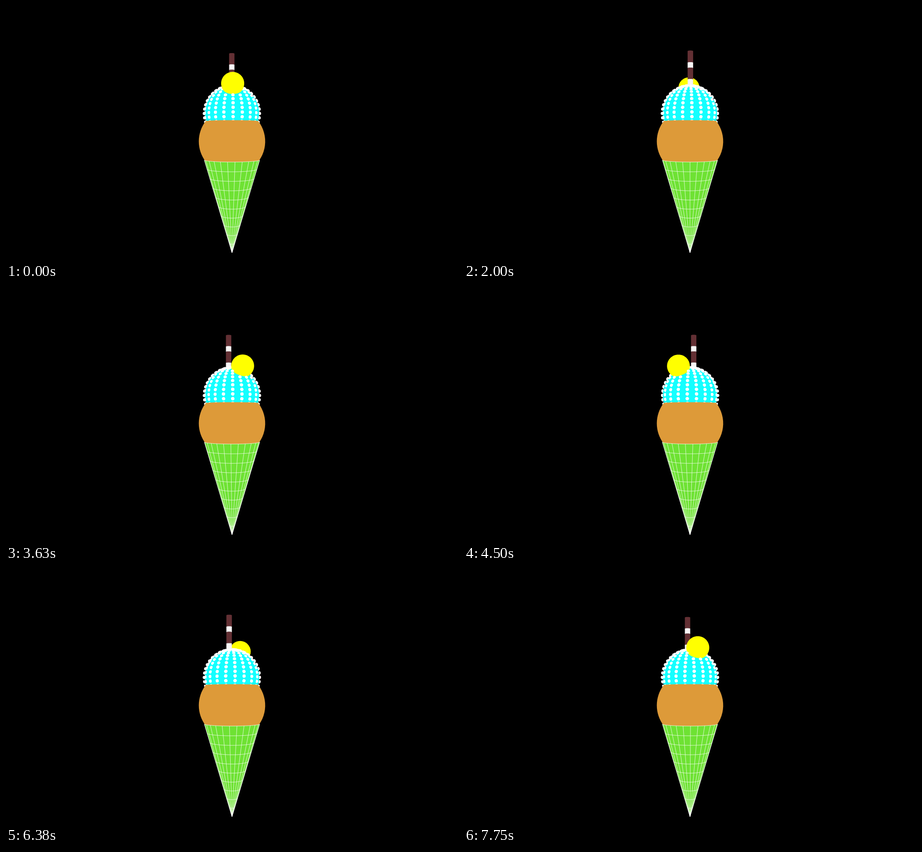
Write an HTML page with a canvas that moves like this. It is 998 by 561 pixels and loops after 7.87 s.

```html
<!DOCTYPE html>
<html>
<head>
<meta charset="utf-8">
<style>
html, body { margin: 0; height: 100%; overflow: hidden; background: #000; }
canvas { display: block; }
</style>
</head>
<body>
<canvas id="stage" width="998" height="561"></canvas>
<script>
const ctx = document.getElementById('stage').getContext('2d');
const { sin, cos, PI, hypot, sqrt, atan2, max, floor } = Math;
const CX = 499, CY = 280.5, EYE = 800, LOOP = 7870;
const SCOOP = { y: -43, r: 60 };
const CHERRY = { y: -104.4, r: 24.3, orbit: 37.3 };
const STRAW = { r: 6, orbit: 12.5 };
const CONE = { top: 59.3, tip: 264.3, r: 61, edge: 1.472, sides: 25, rings: 10 };
const bands = [[-178, -153, '#633034'], [-153, -141, '#fff'], [-141, -116.5, '#633034'], [-116.5, -101, '#fff']];

const project = (x, y, z) => {
  const s = EYE / (EYE - z);
  return [CX + x * s, CY + y * s, s];
};

// Front half of a horizontal circle, from left to right
function ring(r, y, edge = PI / 2, x = 0, z = 0) {
  const pts = [];
  for (let i = 0; i <= 24; i++) {
    const a = edge * (i / 12 - 1);
    pts.push(project(x + r * sin(a), y, z + r * cos(a)));
  }
  return pts;
}

function trace(pts) {
  ctx.beginPath();
  for (const [x, y] of pts) ctx.lineTo(x, y);
}

function fill(pts, color) {
  trace(pts);
  ctx.fillStyle = color;
  ctx.fill();
}

function disc(x, y, r, color) {
  ctx.beginPath();
  ctx.arc(x, y, r, 0, 2 * PI);
  ctx.fillStyle = color;
  ctx.fill();
}

function drawStraw(x, z, turn) {
  for (const [top, bottom, color] of bands) {
    const upper = ring(STRAW.r, top, PI / 2, x, z);
    const lower = ring(STRAW.r, bottom, PI / 2, x, z);
    fill([...upper, ...lower.reverse()], color);
    if (color !== '#fff') continue;
    ctx.strokeStyle = 'rgba(99,48,52,.2)';
    ctx.lineWidth = 0.6;
    for (let i = 0; i < 12; i++) {
      const a = turn + i * PI / 6;
      if (cos(a) < 0.2) continue;
      const px = x + STRAW.r * sin(a), pz = z + STRAW.r * cos(a);
      trace([project(px, top, pz), project(px, bottom, pz)]);
      ctx.stroke();
    }
  }
}

// The part of the cherry that sticks out of the scoop
function drawCherry(x, z) {
  const { y, r } = CHERRY;
  const [px, py, s] = project(x, y, z);
  if (z < 4) return disc(px, py, r * s, '#ff0');
  const d = hypot(x, y - SCOOP.y, z);
  const n = [x / d, (y - SCOOP.y) / d, z / d];
  const depth = d - (d * d + SCOOP.r ** 2 - r * r) / (2 * d);
  const pts = [];
  for (let i = 0; i < 120; i++) {
    const a = i * PI / 60;
    const k = cos(a) * n[0] + sin(a) * n[1];
    let tilt = PI / 2;
    while (tilt > 0 && r * (k * sin(tilt) + n[2] * cos(tilt)) < -depth) tilt -= 0.01;
    pts.push(project(x + r * sin(tilt) * cos(a), y + r * sin(tilt) * sin(a), z + r * 0.6 * cos(tilt)));
  }
  fill(pts, '#ff0');
}

// A bead half sunk into the scoop: outer half disc, inner half ellipse
function drawBead(x, y, z, n) {
  const [px, py, s] = project(x, y, z);
  const r = 3.5 * s;
  const view = [-x, -y, EYE - z];
  const facing = (n[0] * view[0] + n[1] * view[1] + n[2] * view[2]) / hypot(...view);
  if (facing <= 0) return disc(px, py, r, '#fff');
  const dir = atan2(n[1] - view[1] / EYE * facing, n[0] - view[0] / EYE * facing);
  ctx.beginPath();
  ctx.ellipse(px, py, r, r, dir, -PI / 2, PI / 2);
  ctx.ellipse(px, py, r * facing, r, dir, PI / 2, 3 * PI / 2);
  ctx.fillStyle = '#fff';
  ctx.fill();
}

function drawTop(turn) {
  const at = r => [r * sin(turn), r * cos(turn)];
  const [chx, chz] = at(CHERRY.orbit), [stx, stz] = at(-STRAW.orbit);
  const parts = [
    { z: 4.6, draw: () => disc(CX, CY + SCOOP.y, SCOOP.r, '#14ffff') },
    { z: chz, draw: () => drawCherry(chx, chz) },
    { z: stz, draw: () => drawStraw(stx, stz, turn) }
  ];
  for (let row = -3; row <= 10; row++) {
    const lat = row * PI / 20;
    for (let col = 0; col < 20; col++) {
      const lon = turn + col * PI / 10;
      const n = [cos(lat) * sin(lon), -sin(lat), cos(lat) * cos(lon)];
      const x = 61 * n[0], y = SCOOP.y + 61 * n[1], z = 61 * n[2];
      if (hypot(x - chx, y - CHERRY.y, z - chz) < CHERRY.r) continue;
      parts.push({ z, draw: () => drawBead(x, y, z, n) });
    }
  }
  parts.sort((a, b) => a.z - b.z).forEach(p => p.draw());
}

function drawMiddle() {
  trace(ring(57.8, -26.3));
  ctx.arc(CX, 299, 73.3, -0.66, PI + 0.66);
  ctx.fillStyle = '#dd9a39';
  ctx.fill();
}

function drawCone(turn) {
  const { top, tip, r, edge, sides, rings } = CONE;
  const apex = project(0, tip, 0);
  const rim = ring(r, top, edge);
  fill([...rim, apex], '#6ee233');
  ctx.strokeStyle = 'rgba(255,255,255,.75)';
  ctx.lineWidth = 1;
  for (let i = 0; i < rings; i++) {
    const k = i / rings;
    trace(ring(r * (1 - k), top + (tip - top) * k, edge));
    ctx.stroke();
  }
  for (let i = 0; i < sides; i++) {
    const a = turn + PI / 2 + i * 2 * PI / sides;
    if (cos(a) < cos(edge)) continue;
    trace([project(r * sin(a), top, r * cos(a)), apex]);
    ctx.stroke();
  }
  trace([rim[0], apex, rim[24]]);
  ctx.stroke();
}

function draw(now) {
  const t = now % LOOP;
  // Eight poses a second, held for 130 and 120 ms in turn
  const step = 2 * floor(t / 250) + (t % 250 >= 130 ? 1 : 0);
  const turn = 0.038 - max(0, 7.5 * step - 1) * PI / 120;
  ctx.fillStyle = '#000';
  ctx.fillRect(0, 0, 998, 561);
  ctx.lineJoin = 'round';
  drawTop(turn);
  drawMiddle();
  drawCone(turn);
  requestAnimationFrame(draw);
}
requestAnimationFrame(draw);
</script>
</body>
</html>
```
